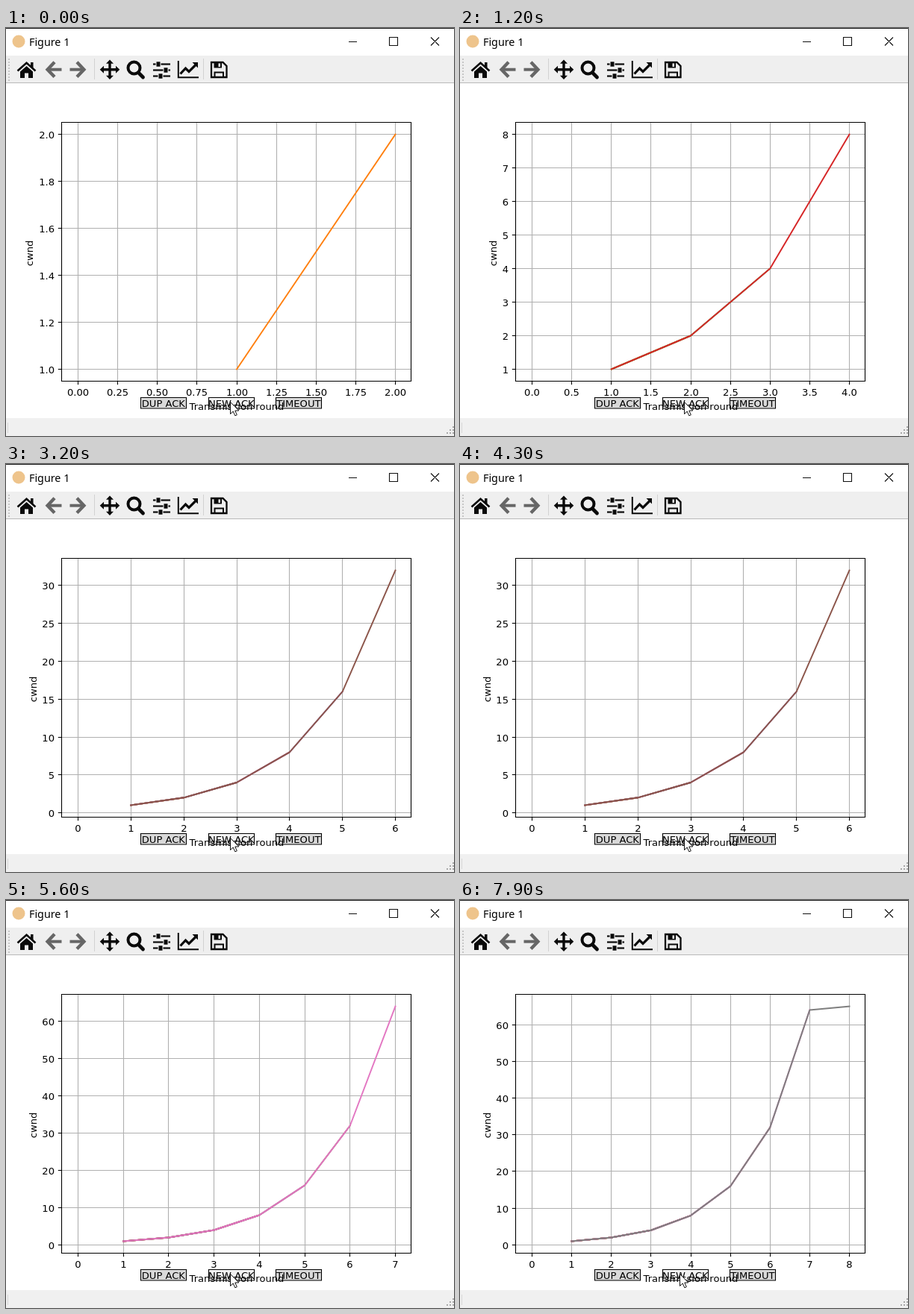
These frames come from a looping animation (600 by 547 pixels, 8000 ms). An HTML page with a canvas:

```html
<!DOCTYPE html>
<html lang="en">
<head>
<meta charset="utf-8">
<title>Figure 1</title>
<style>
  html, body { margin: 0; width: 600px; height: 547px; overflow: hidden; background: #fff; }
  canvas { display: block; }
</style>
</head>
<body>
<canvas id="stage" width="600" height="547"></canvas>
<script>
const ctx = document.getElementById('stage').getContext('2d');
const LOOP = 8000;
const PLOT_FONT = '13.1px "DejaVu Sans", sans-serif';
const BOX = { left: 74.5, top: 126.5, right: 542.5, bottom: 473.5 };
const COLORS = ['#1f77b4', '#ff7f0e', '#2ca02c', '#d62728', '#9467bd', '#8c564b', '#e377c2', '#7f7f7f'];
const CWND = [1, 2, 4, 8, 16, 32, 64, 65];

// Start time, number of points, tick steps with decimals, baseline of the y label
const STATES = [
  { at: 0,    n: 2, dx: 0.25, xd: 2, dy: 0.2, yd: 1, label: 36 },
  { at: 300,  n: 3, dx: 0.5,  xd: 1, dy: 0.5, yd: 1, label: 36 },
  { at: 1200, n: 4, dx: 0.5,  xd: 1, dy: 1,   yd: 0, label: 49 },
  { at: 2200, n: 5, dx: 1,    xd: 0, dy: 2,   yd: 0, label: 41 },
  { at: 3200, n: 6, dx: 1,    xd: 0, dy: 5,   yd: 0, label: 41 },
  { at: 4700, n: 7, dx: 1,    xd: 0, dy: 10,  yd: 0, label: 41 },
  { at: 7200, n: 8, dx: 1,    xd: 0, dy: 10,  yd: 0, label: 41 }
];
const CURSOR = [{ at: 0, x: 300.5 }, { at: 7700, x: 298.5 }, { at: 7800, x: 296.5 }, { at: 7900, x: 294.5 }];

const current = (steps, t) => steps.filter(s => s.at <= t).pop();
const snap = v => Math.floor(v + 0.01) + 0.5;

function rect(x, y, w, h, color) {
  ctx.fillStyle = color;
  ctx.fillRect(x, y, w, h);
}

function line(points, width, color, cap = 'butt', join = 'miter') {
  ctx.beginPath();
  points.forEach(([x, y]) => ctx.lineTo(x, y));
  Object.assign(ctx, { lineWidth: width, strokeStyle: color, lineCap: cap, lineJoin: join });
  ctx.stroke();
}

function shape(d, fill, stroke, width = 1) {
  const path = new Path2D(d);
  if (fill) {
    ctx.fillStyle = fill;
    ctx.fill(path, 'evenodd');
  }
  if (stroke) {
    Object.assign(ctx, { lineWidth: width, strokeStyle: stroke, lineCap: 'butt', lineJoin: 'miter' });
    ctx.stroke(path);
  }
}

function text(str, x, y, align = 'center', font = PLOT_FONT) {
  Object.assign(ctx, { font, textAlign: align, textBaseline: 'alphabetic', fillStyle: '#000' });
  ctx.fillText(str, x, y);
}

function titleBar() {
  rect(0, 0, 600, 1, '#1a1a1a');
  ctx.beginPath();
  ctx.arc(17, 18, 8.5, 0, 7);
  ctx.fillStyle = '#eec48c';
  ctx.fill();
  text('Figure 1', 31, 23.5, 'left', '14.3px "Noto Sans", sans-serif');
  shape('M459 18.5H470M513.5 12.5H524.5V23.5H513.5ZM569 12.5L580 23.5M580 12.5L569 23.5', null, '#111', 1.1);
}

function toolbar() {
  const ink = '#0a0a0a', dim = '#666';
  rect(0, 37, 600, 36, '#efefef');
  rect(0, 73, 600, 1, '#b9b9b9');
  for (let y = 41; y < 70; y += 4) rect(3, y, 2, 2, '#c6c6c6');
  for (const x of [118, 264]) rect(x, 41, 1, 28, '#d2d2d2');

  // Home
  line([[15.5, 57.5], [27.5, 46.8], [39.5, 57.5]], 2.6, ink);
  shape('M33 46H36.5V54L33 51ZM19 58.5L27.5 51L36 58.5V67H30V60.5H25V67H19Z', ink);

  // Back and forward
  for (const [x, dir] of [[53, 1], [107, -1]]) {
    line([[x + dir * 3, 55.7], [x + dir * 21.5, 55.7]], 4, dim);
    line([[x + dir * 12, 45.8], [x + dir * 2.6, 55.7], [x + dir * 12, 65.6]], 4.4, dim);
  }

  // Pan
  for (let i = 0; i < 4; i++) {
    ctx.save();
    ctx.translate(139, 55.7);
    ctx.rotate(i * Math.PI / 2);
    shape('M-1.7 0V-8H-5L0 -13.3L5 -8H1.7V0Z', ink);
    ctx.restore();
  }

  // Zoom
  ctx.beginPath();
  ctx.arc(171.5, 53.5, 8, 0, 7);
  ctx.lineWidth = 4;
  ctx.strokeStyle = ink;
  ctx.stroke();
  line([[177.5, 60], [183.5, 66]], 4.8, ink, 'round');

  // Sliders
  for (const [y, x] of [[48.5, 204], [56.5, 214], [64.5, 207]]) {
    line([[197, y], [220, y]], 2.2, ink);
    rect(x - 3.5, y - 3.5, 7, 7, '#efefef');
    rect(x - 2.5, y - 3.2, 5, 6.4, ink);
  }

  // Chart
  line([[230.8, 44], [230.8, 66.3], [258, 66.3]], 2, ink);
  line([[233.5, 61.5], [240.5, 54], [245, 58.5], [254, 49.5]], 3.2, ink);
  shape('M249.5 46H257V53.5Z', ink);

  // Save
  shape('M275 46H290.5L295.5 51V66H275Z', null, ink, 2.3);
  shape('M278.5 46H289V53.5H278.5ZM284.5 47.3V52H287V47.3Z', ink);
  shape('M279.5 66V59.5H291V66', null, ink, 2);
}

function statusBar() {
  rect(0, 523, 600, 24, '#f0f0f0');
  rect(2, 529, 1, 14, '#d6d6d6');
  for (let row = 0; row < 3; row++)
    for (let col = 0; col <= row; col++)
      rect(598 - col * 4, 534 + row * 4, 2, 2, '#a8a8a8');
}

function buttons() {
  [['DUP ACK', 180.5], ['NEW ACK', 271.5], ['TIMEOUT', 361.5]].forEach(([name, x], i) => {
    shape(`M${x} 495.5h61v14.5h-61Z`, i === 1 ? '#f2f2f2' : '#d9d9d9', '#000', 1.1);
    text(name, x + 30.3, 507.7);
  });
}

function plot({ n, dx, xd, dy, yd, label }) {
  const top = CWND[n - 1];
  const px = v => 96.5 + v / n * 425;
  const py = v => 457.5 - (v - 1) / (top - 1) * 315;
  const { left, right, bottom } = BOX;
  const marks = [];

  for (let i = 0; i * dx <= n; i++) {
    const x = snap(px(i * dx));
    line([[x, BOX.top], [x, bottom]], 1.1, '#b0b0b0');
    marks.push([[x, bottom], [x, bottom + 4.7]]);
    text((i * dx).toFixed(xd), x, 493);
  }
  const low = 1 - (top - 1) * 0.05;
  for (let i = Math.ceil(low / dy); i * dy <= top + 1e-6; i++) {
    const y = snap(py(i * dy));
    line([[left, y], [right, y]], 1.1, '#b0b0b0');
    marks.push([[left - 4.7, y], [left, y]]);
    text((i * dy).toFixed(yd), 65, y + 5.3, 'right');
  }

  // Every earlier curve stays beneath the newest one
  for (let k = 2; k <= n; k++)
    line(CWND.slice(0, k).map((v, i) => [px(i + 1), py(v)]), 1.95, COLORS[k - 1], 'square', 'round');

  marks.forEach(m => line(m, 1.1, '#000'));
  shape(`M${left} ${BOX.top}H${right}V${bottom}H${left}Z`, null, '#000', 1.1);

  text('Transmission round', 309, 512);
  ctx.save();
  ctx.translate(label, 302);
  ctx.rotate(-Math.PI / 2);
  text('cwnd', 0, 0);
  ctx.restore();
}

function pointer(x) {
  ctx.save();
  ctx.translate(x, 501.5);
  shape('M0 0V16L3.7 12.5L6.3 18.3L8.8 17.2L6.3 11.5H11.3Z', '#fff', '#111', 1);
  ctx.restore();
}

function draw(now) {
  const t = now % LOOP;
  rect(0, 0, 600, 547, '#fff');
  titleBar();
  toolbar();
  buttons();
  plot(current(STATES, t));
  statusBar();
  pointer(current(CURSOR, t).x);
}

const start = performance.now();
function tick() {
  draw(performance.now() - start);
  requestAnimationFrame(tick);
}
tick();
</script>
</body>
</html>
```
